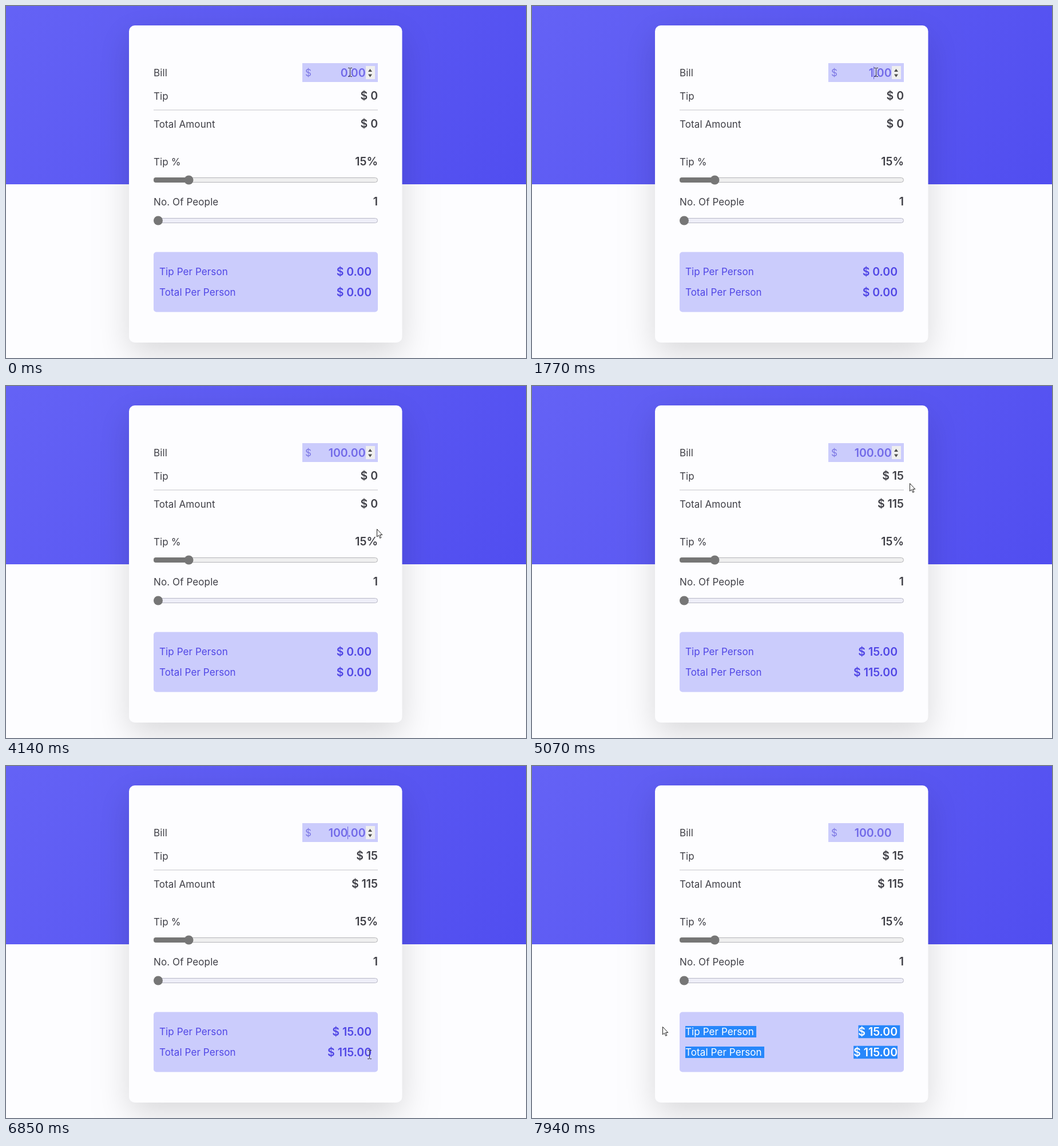
An HTML page with a canvas that plays this animation: 909 px wide and 616 px high, repeating every 7990 ms.

```html
<!DOCTYPE html>
<html lang="en">
<head>
<meta charset="utf-8">
<title>Tip calculator</title>
<style>
  html, body { margin: 0; width: 100%; height: 100%; overflow: hidden; background: #fdfdff; }
  canvas { display: block; }
</style>
</head>
<body>
<canvas id="stage" width="909" height="616"></canvas>
<script>
const ctx = document.getElementById('stage').getContext('2d');
const LOOP = 7990, CALCULATED = 4500, DRAG = 7300, BLINK = 530;
const LEFT = 258, RIGHT = 650;
const INK = '#3f3f46', INDIGO = '#5046e5', LAVENDER = '#cbccfc';

// Time and text of the bill field
const typing = [[0, '0.00'], [1450, '.00'], [1650, '1.00'], [2050, '10.00'], [2350, '100.00']];

// Pointer path: time, x, y
const path = [
  [0, 601, 116], [2980, 601, 116], [3140, 625, 575], [3300, 640, 388], [3700, 650, 300],
  [4140, 648, 250], [4500, 650, 240], [5000, 662, 165], [5350, 640, 215], [5700, 620, 270],
  [5870, 566, 386], [6100, 600, 440], [6500, 634, 490], [6850, 635, 505], [7300, 639, 504],
  [7480, 520, 500], [7720, 300, 480], [7900, 228, 456], [LOOP, 228, 456]
];

function pointerAt(t) {
  const i = Math.max(1, path.findIndex(p => p[0] > t));
  const [t0, x0, y0] = path[i - 1], [t1, x1, y1] = path[i];
  const u = (t - t0) / (t1 - t0), k = u * u * (3 - 2 * u);
  return { x: x0 + (x1 - x0) * k, y: y0 + (y1 - y0) * k };
}

function box(x, y, w, h, r, fill, stroke) {
  ctx.beginPath();
  ctx.roundRect(x, y, w, h, r);
  if (fill) { ctx.fillStyle = fill; ctx.fill(); }
  if (stroke) { ctx.strokeStyle = stroke; ctx.lineWidth = 1; ctx.stroke(); }
}

function label(text, x, y, color = INK) {
  ctx.font = '400 17px Inter, sans-serif';
  ctx.letterSpacing = '0.1px';
  ctx.textAlign = 'left';
  ctx.fillStyle = color;
  ctx.fillText(text, x, y);
}

function value(text, x, y, color = INK) {
  ctx.font = '600 19.5px Inter, sans-serif';
  ctx.letterSpacing = '0px';
  ctx.textAlign = 'right';
  ctx.fillStyle = color;
  ctx.fillText(text, x, y);
  return x - ctx.measureText(text).width;
}

function slider(y, thumb, fill, border) {
  box(LEFT + .5, y - 4, RIGHT - LEFT - 1, 8, 4, fill, border);
  if (thumb > 270) box(LEFT, y - 4.5, thumb - LEFT, 9, 4, '#767676');
  box(thumb - 8, y - 8, 16, 16, 8, '#767676');
}

function shape(points, fill, stroke) {
  ctx.beginPath();
  points.forEach(([x, y]) => ctx.lineTo(x, y));
  ctx.closePath();
  ctx.fillStyle = fill;
  ctx.fill();
  if (stroke) { ctx.strokeStyle = stroke; ctx.lineWidth = 1; ctx.stroke(); }
}

function background() {
  ctx.fillStyle = '#fdfdff';
  ctx.fillRect(0, 0, 909, 616);
  const sky = ctx.createLinearGradient(150, -140, 760, 450);
  sky.addColorStop(0, '#6462f5');
  sky.addColorStop(1, '#514ef0');
  ctx.fillStyle = sky;
  ctx.fillRect(0, 0, 909, 312);
  ctx.save();
  ctx.shadowColor = 'rgba(0,0,0,.14)';
  ctx.shadowBlur = 56;
  ctx.shadowOffsetY = 20;
  box(215, 34, 477.5, 555, 10, '#fdfdff');
  ctx.restore();
}

function billField(t) {
  box(518, 100, 132, 33, 0, LAVENDER);
  label('$', 523, 123, '#7d78e4');
  const typed = typing.filter(s => s[0] <= t).pop();
  value(typed[1], 628.5, 123.5, '#7169e8');
  if (t >= DRAG) return;
  const caretX = Math.round(628.5 - ctx.measureText('.00').width);
  box(629, 105, 16, 23, 0, '#efefef');
  shape([[633, 115], [636.5, 110], [640, 115]], '#4c4c4c');
  shape([[633, 119.5], [636.5, 124.5], [640, 119.5]], '#4c4c4c');
  const phase = Math.floor((t - typed[0]) / BLINK) % 2;
  if (typed[0] ? phase === 0 : phase === 1) {
    ctx.fillStyle = '#6a62e6';
    ctx.fillRect(caretX, 106, 1, 22);
  }
}

function panelRow(name, amount, y, from, trailing) {
  label(name, 268, y, INDIGO);
  const nameEnd = 268 + ctx.measureText(name).width + 4.5;
  const start = value(amount, 639, y + .5, INDIGO);
  const parts = [[268, nameEnd, y - 16, 20], [start, 639 + trailing, y - 17.5, 23]];
  for (const [x0, x1, top, h] of parts) {
    const x = Math.max(x0, from);
    if (x >= x1) continue;
    ctx.save();
    ctx.beginPath();
    ctx.rect(x, top, x1 - x, h);
    ctx.clip();
    ctx.fillStyle = '#2787fb';
    ctx.fillRect(x, top, x1 - x, h);
    label(name, 268, y, '#fff');
    value(amount, 639, y + .5, '#fff');
    ctx.restore();
  }
}

const handOutline = new Path2D('M4.5 12V2Q4.5 .5 5.8 .5T7.2 2V7Q9.5 6 9.9 7.8Q12 7 12.5 8.8Q14.5 8 14.8 10V14Q14.8 16.5 13.2 18V19.5H5.8V18L1 12.5Q0 10.5 1.5 10Q2.5 9.8 4.5 12Z');
const handFingers = new Path2D('M7.2 7V10M9.9 8V10.5M12.5 9V11');

function drawPointer({ x, y }, kind) {
  ctx.save();
  ctx.translate(Math.round(x), Math.round(y));
  if (kind === 'beam') {
    ctx.fillStyle = '#333';
    ctx.fillRect(0, -7, 1, 14);
    for (const end of [-8, 7]) {
      ctx.fillRect(-3, end, 3, 1);
      ctx.fillRect(1, end, 3, 1);
    }
  } else if (kind === 'hand') {
    ctx.translate(-5.5, -1);
    ctx.fillStyle = '#fff';
    ctx.fill(handOutline);
    ctx.strokeStyle = '#000';
    ctx.lineWidth = 1.1;
    ctx.stroke(handOutline);
    ctx.stroke(handFingers);
  } else {
    shape([[.5, .5], [.5, 14], [3.5, 11.2], [5.7, 16.3], [7.8, 15.4], [5.6, 10.5], [9.8, 10.5]], '#fff', '#222');
  }
  ctx.restore();
}

function draw(t) {
  const pointer = pointerAt(t), { x, y } = pointer;
  const inside = x >= LEFT && x <= RIGHT;
  const onSlider = center => inside && Math.abs(y - center) < 13;
  const done = t >= CALCULATED;

  background();
  label('Bill', LEFT, 122.5);
  billField(t);
  const rows = [
    ['Tip', done ? '$ 15' : '$ 0', 164],
    ['Total Amount', done ? '$ 115' : '$ 0', 213],
    ['Tip %', '15%', 278.5],
    ['No. Of People', '1', 349]
  ];
  for (const [name, amount, base] of rows) {
    label(name, LEFT, base);
    value(amount, RIGHT, base);
  }
  ctx.fillStyle = '#c3c3ca';
  ctx.fillRect(LEFT, 181.5, RIGHT - LEFT, 1);
  slider(304.5, 319.5, onSlider(304.5) ? '#e4e4e4' : '#efefef', '#b5b5b8');
  const hover = onSlider(375.5);
  slider(375.5, 266, hover ? '#e3e3e8' : '#eeeef8', hover ? '#a2a2a6' : '#b8b8c6');

  box(258, 430.5, 392, 105, 5, LAVENDER);
  const dragging = t >= DRAG, upper = dragging && y < 483;
  panelRow('Tip Per Person', done ? '$ 15.00' : '$ 0.00', 471, upper ? x : 999, 4.5);
  panelRow('Total Per Person', done ? '$ 115.00' : '$ 0.00', 507, upper ? 0 : dragging ? x : 999, 0);

  const overText = inside && (x > 565 || x < 400) &&
    [116, 158, 207, 272, 343, 465, 501].some(mid => Math.abs(y - mid) < 12);
  const kind = hover || onSlider(304.5) ? 'hand' : overText || (dragging && inside) ? 'beam' : 'arrow';
  if (t < 2050 || t >= 2980) drawPointer(pointer, kind);
}

function tick() {
  draw(performance.now() % LOOP);
  requestAnimationFrame(tick);
}
tick();
</script>
</body>
</html>
```
